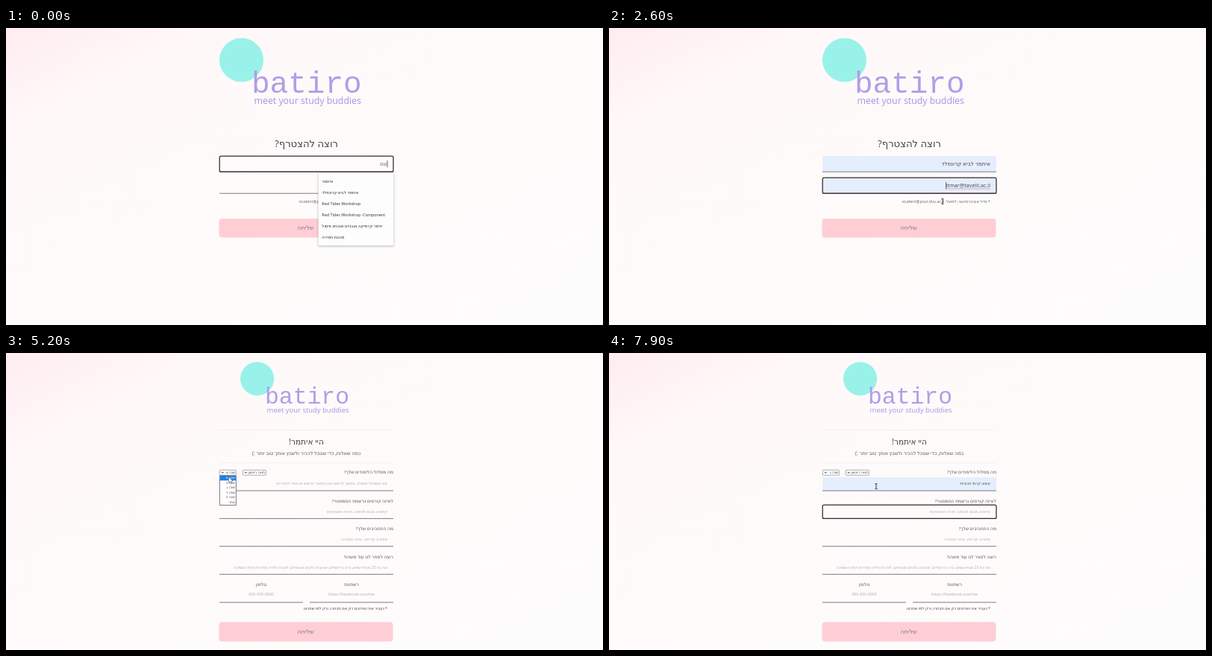
Animation, 800 px wide and 399 px high, one loop 8000 ms. Source, as an HTML page with a canvas:

```html
<!DOCTYPE html>
<html lang="he">
<head>
<meta charset="utf-8">
<title>Sign-up form</title>
<style>
  html, body { margin: 0; width: 100%; height: 100%; overflow: hidden; background: #fffbfb; }
  canvas { display: block; width: 100%; height: 100%; }
</style>
</head>
<body>
<canvas id="stage" width="800" height="399"></canvas>
<script>
const ctx = document.getElementById('stage').getContext('2d');
const LOOP = 8000;
const SANS = '"Open Sans", "Noto Sans", "DejaVu Sans", sans-serif';
const MONO = '"Liberation Mono", monospace';
const LEFT = 286, RIGHT = 519, TEXT_RIGHT = 511, MID = 402.5;
const FILLED = '#e5eefd', INK = '#444', LINE = '#7c7a80', HINT = '#aaa8ab', RING = '#2c2c2e';
const HINT_SIZE = 5.15;

const FULL_NAME = 'איתמר לביא קרונפלד';
const EMAIL = 'itmar@tavelil.ac.il';
const CRAFT = 'עיצוב קרמי וזכוכית';
const NAMES = ['איתמר', FULL_NAME, 'Red Tides Workshop', 'Red Tides Workshop -Component',
  'חימר קרמיקה אובניים אובנים פיסול', 'מכונת תפירה'];
const EMAILS = ['o@post.dvu.ac.il', 'textiles.tavelil@zivox.com', 'itmarlavia@zivox.com',
  EMAIL, 'https://10minutemail.com/10Mi', 'k4827156@ovlat.com'];
const YEARS = ['שנה א', 'שנה ב', 'שנה ג', 'שנה ד', 'שנה ה', 'אחר'];

// time, x, y, pointer kind
const POINTER = [
  [700, 474, 196, 'beam'], [800, 470, 208, 'beam'], [1000, 466, 217, 'beam'],
  [1700, 466, 217, 'beam'], [1900, 472, 218, 'beam'], [2100, 472, 218, 'beam'],
  [2400, 447, 233, 'beam'], [2600, 447, 233, 'beam'], [2900, 432, 250, 'arrow'],
  [3400, 409.5, 267, 'arrow'], [4100, 409.5, 267, 'arrow'], [5000, 298, 160, 'arrow'],
  [5100, 298, 160, 'arrow'], [5200, 298.5, 166.5, 'arrow'], [5400, 298, 180, 'arrow'],
  [5700, 301, 180, 'arrow'], [5800, 301, 180, 'arrow'], [5900, 316, 179, 'beam'],
  [6100, 342, 179, 'beam'], [6700, 342, 179, 'beam'], [7100, 358, 179, 'beam']
];

function text(s, x, y, size, o = {}) {
  ctx.font = `${o.weight || 400} ${size}px ${o.font || SANS}`;
  ctx.direction = /[א-ת]/.test(s) ? 'rtl' : 'ltr';
  ctx.textAlign = o.align || 'right';
  ctx.fillStyle = o.color || INK;
  ctx.fillText(s, x, y + size * 0.28);
  return ctx.measureText(s).width;
}

function box(x, y, w, h, r, fill, stroke, width = 1) {
  ctx.beginPath();
  ctx.roundRect(x, y, w, h, r);
  if (fill) { ctx.fillStyle = fill; ctx.fill(); }
  if (stroke) { ctx.strokeStyle = stroke; ctx.lineWidth = width; ctx.stroke(); }
}

function path(points, color, width) {
  ctx.beginPath();
  points.forEach(([x, y]) => ctx.lineTo(x, y));
  ctx.strokeStyle = color;
  ctx.lineWidth = width;
  ctx.stroke();
}

const rule = (x1, x2, y, color = LINE, width = 1) => path([[x1, y], [x2, y]], color, width);
const caret = (x, y, h) => path([[x, y - h / 2], [x, y + h / 2]], '#333', 0.7);

function background() {
  const g = ctx.createLinearGradient(0, 0, 320, 640);
  g.addColorStop(0, '#ffecef');
  g.addColorStop(0.16, '#fff7f8');
  g.addColorStop(0.32, '#fffafa');
  g.addColorStop(1, '#fdfcfc');
  ctx.fillStyle = g;
  ctx.fillRect(0, 0, 800, 399);
}

function logo(x, scale) {
  ctx.save();
  ctx.translate(x, 7);
  ctx.scale(scale, scale);
  ctx.fillStyle = '#98f2e9';
  ctx.beginPath();
  ctx.arc(29.5, 36, 29.5, 0, Math.PI * 2);
  ctx.fill();
  text('batiro', 43, 68.6, 41, { font: MONO, align: 'left', color: '#ae9fe7' });
  text('meet your study buddies', 46.5, 91.5, 12.35, { align: 'left', color: '#a593e4' });
  ctx.restore();
}

function field(y, h, o) {
  if (o.value && o.tint !== false) box(LEFT, y, RIGHT - LEFT, h, 0, FILLED);
  rule(LEFT, RIGHT, y + h);
  if (o.focus) box(LEFT + 0.2, y, RIGHT - LEFT - 0.2, h, 2, null, RING, 1.25);
  const mid = y + h / 2 + (o.shift || 0);
  const width = text(o.value || o.hint, TEXT_RIGHT, mid, o.size, { color: o.value ? INK : o.hintColor || HINT });
  if (o.caret) caret(o.value ? TEXT_RIGHT - width : TEXT_RIGHT, mid, o.size * 1.3);
  return width;
}

function suggestions(x, y, w, h, items, first, active) {
  ctx.save();
  ctx.shadowColor = 'rgba(0,0,0,.35)';
  ctx.shadowBlur = 2.5;
  ctx.shadowOffsetY = 0.8;
  box(x, y, w, h, 1, '#fefdfe');
  ctx.restore();
  ctx.save();
  ctx.beginPath();
  ctx.rect(x, y, w, h);
  ctx.clip();
  items.forEach((s, i) => {
    const mid = first + i * 15.15;
    if (i === active) box(x, mid - 7.5, w, 15.1, 0, '#e9e9eb');
    text(s, x + 4.8, mid, 5.45, { align: 'left', weight: 500, color: '#2a2a2a' });
  });
  ctx.restore();
}

function button(y, h, hover, focus) {
  box(LEFT - 0.5, y, RIGHT - LEFT, h, 4, hover ? '#ffd9de' : '#ffced5');
  if (focus) box(LEFT - 0.8, y - 0.5, RIGHT - LEFT + 0.6, h + 1, 2, null, RING, 1.2);
  text('שליחה', 401.5, y + h / 2, 8, { align: 'center', color: '#85767a' });
}

function joinPage(t) {
  logo(286, 1);
  text('רוצה להצטרף?', MID, 156, 13.2, { align: 'center' });

  const named = t >= 600, mailed = t >= 1600;
  field(172, 21.2, {
    value: named && FULL_NAME, hint: 'שם', hintColor: '#777', size: 7.26,
    focus: t < 1000, caret: t < 500 || (t >= 600 && t < 1000)
  });

  const onMail = t >= 1000 && t < 3500;
  const typed = t >= 1200 && !mailed;
  const width = field(201, 21.2, {
    value: mailed ? EMAIL : typed && 'a', tint: mailed, hint: 'מייל', hintColor: '#777', size: 7.26,
    focus: onMail, caret: onMail && (typed || t % 1000 >= 500 || t < 1200)
  });
  if (mailed && onMail) {
    ctx.setLineDash([1, 0.6]);
    rule(TEXT_RIGHT - width, TEXT_RIGHT, 216, '#d9616b', 0.8);
    ctx.setLineDash([]);
  }

  text('* מייל אוניברסיטאי, למשל: student@post.dvu.ac.il', TEXT_RIGHT, 233, 5.4, { color: '#666' });
  button(256, 25.5, t >= 3000, t >= 3500);

  if (!named) suggestions(418.5, 195, 101, 97.5, NAMES, 206, t < 200 ? -1 : t < 400 ? 0 : 1);
  if (typed) suggestions(438.8, 224, 82.5, 97.5, EMAILS, 235, t < 1400 ? -1 : t < 1500 ? 1 : 3);
}

function select(x, w, s) {
  box(x + 0.3, 157.2, w, 7, 0.8, '#fff', '#888', 0.7);
  path([[x + 2.8, 159.8], [x + 4.3, 161.4], [x + 5.8, 159.8]], '#222', 0.9);
  text(s, x + w - 1, 160.8, 4.6);
}

function yearList(active) {
  box(286.3, 164.8, 22, 39.6, 0, '#fff', '#555', 0.8);
  YEARS.forEach((s, i) => {
    const mid = 168 + i * 6.5;
    if (i === active) box(286.7, mid - 3.2, 21.2, 6.5, 0, '#1c80e8');
    text(s, 306.8, mid, 4.6, { color: i === active ? '#fff' : INK });
  });
}

function detailsPage(t) {
  logo(314, 0.766);
  rule(LEFT, RIGHT, 103.5, '#f8ecee');
  rule(LEFT, RIGHT, 147.5, '#f8ecee');
  text('היי איתמר!', MID, 120.5, 10.6, { align: 'center' });
  text('כמה שאלות, כדי שנוכל להכיר ולשבץ אותך טוב יותר :)', 402.8, 135, 6.55, { align: 'center', color: '#555' });

  const label = (s, y) => text(s, RIGHT, y, 6.05, { color: '#555' });
  label('מה מסלול הלימודים שלך?', 160.8);
  label('לאיזה קורסים נרשמת הסמסטר?', 199);
  label('מה התחביבים שלך?', 236.8);
  label('רוצה לספר לנו עוד משהו?', 274);
  select(317, 31, 'תואר ראשון');
  select(286, 22, YEARS[t >= 5500 ? 2 : 0]);

  const onTrack = t >= 6100 && t < 7600, picked = t >= 6900, onCourse = t >= 7600;
  field(167, 18, {
    value: picked && CRAFT, hint: 'אם במסלול משולב, אפשר לרשום את התואר הראשי או אחד לבחירתך',
    size: HINT_SIZE, shift: -0.5, focus: onTrack, caret: onTrack && (t < 6500 || t >= 7000 && t < 7500)
  });
  field(204, 18.4, {
    hint: 'קיימות, מבוא לפסיכו, תורת המשחקים', size: HINT_SIZE,
    focus: onCourse, caret: onCourse && t < 7900
  });
  field(241, 18.7, { hint: 'ספורט, קריאה, נגינה בגיטרה', size: HINT_SIZE });
  field(279, 18.3, {
    hint: 'אני בת 25 מבית שמש, גרה בירושלים, אוהבת בלונים מנופחים, לאכול גלידה וסדרות תחת השמיכה',
    size: HINT_SIZE
  });

  const half = (x1, x2, name, hint) => {
    const mid = (x1 + x2) / 2;
    text(name, mid, 311.3, 6.05, { align: 'center', color: '#555' });
    text(hint, mid, 325, 5.25, { align: 'center', color: HINT });
    rule(x1, x2, 335);
  };
  half(286, 398, 'טלפון', '000-555-0000');
  half(407, 519, 'רשתונת', 'https://facebook.com/me');
  text('* נעביר את הפרטים רק אם תבחרו, ורק למי שתרצו', TEXT_RIGHT, 344, 5.25);
  button(361.5, 26, false, false);

  if (t >= 5100 && t < 5500) yearList(t < 5300 ? 0 : t < 5400 ? 1 : 2);
  if (onTrack && !picked) {
    box(287.5, 172.3, 4.3, 6.5, 0.8, '#ddd', '#888', 0.8);
    rule(288.8, 290.6, 175.5, '#777', 1.2);
    suggestions(438.8, 187, 80.5, 36, ['גלעדור', CRAFT], 197, t < 6700 ? -1 : t < 6800 ? 0 : 1);
  }
}

function pointer(t) {
  if (t < POINTER[0][0]) return;
  let i = 0;
  while (i < POINTER.length - 1 && POINTER[i + 1][0] <= t) i++;
  const a = POINTER[i], b = POINTER[i + 1] || a;
  const k = b === a ? 0 : (t - a[0]) / (b[0] - a[0]);
  ctx.save();
  ctx.translate(a[1] + (b[1] - a[1]) * k, a[2] + (b[2] - a[2]) * k);
  if (a[3] === 'beam') {
    path([[0, -3.2], [0, 3.2]], '#222', 0.9);
    rule(-1.6, 1.6, -3.4, '#222', 0.8);
    rule(-1.6, 1.6, 3.4, '#222', 0.8);
  } else {
    const tip = [[0, 0], [0, 7.4], [1.7, 5.9], [2.8, 8.5], [3.9, 8], [2.8, 5.5], [5, 5.3], [0, 0]];
    path(tip, '#222', 1);
    ctx.fillStyle = '#fff';
    ctx.fill();
  }
  ctx.restore();
}

function frame(now) {
  const t = Math.floor((now % LOOP) / 100) * 100;
  background();
  (t < 4000 ? joinPage : detailsPage)(t);
  pointer(t);
  requestAnimationFrame(frame);
}
frame(0);
</script>
</body>
</html>
```
